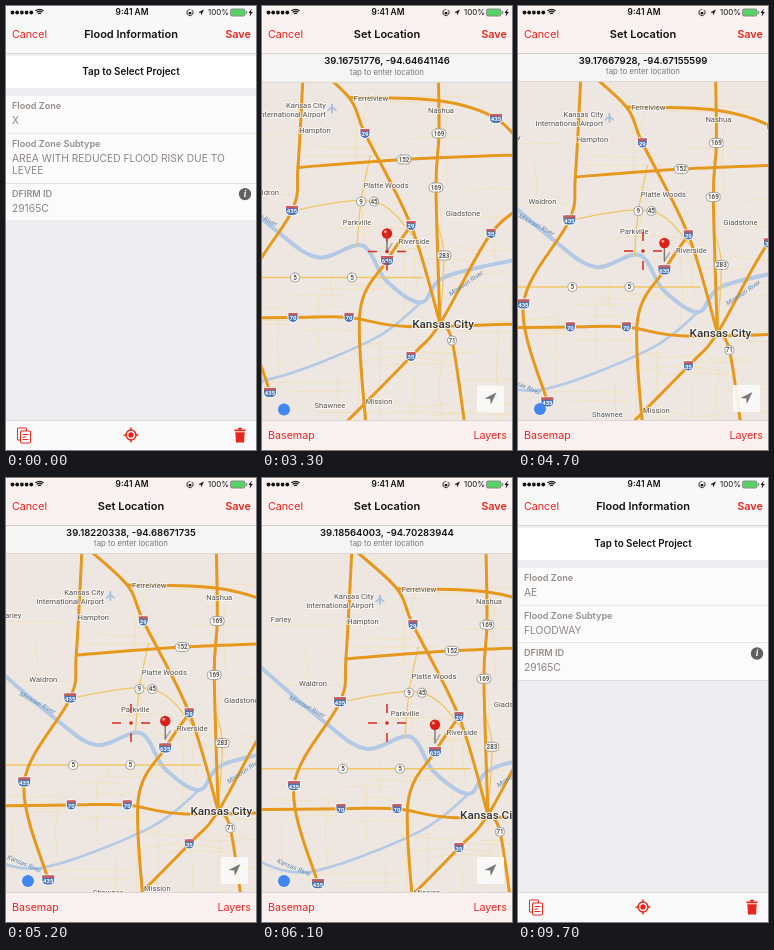
These frames come from a looping animation (250 px wide and 444 px high, 9900 ms). An HTML page with a canvas:

```html
<!DOCTYPE html>
<html lang="en">
<head>
<meta charset="utf-8">
<title>Flood information</title>
<style>
html, body { margin: 0; width: 100%; height: 100%; overflow: hidden; background: #eeedf1; }
canvas { display: block; }
</style>
</head>
<body>
<canvas id="stage" width="250" height="444"></canvas>
<script>
const ctx = document.getElementById('stage').getContext('2d');
const W = 250, H = 444, LOOP = 9900, STEP = 100;
const RED = '#e8261d', INK = '#111', GREY = '#8c8582', LINE = '#d0cccb';
const OPEN_AT = 2800, CLOSE_AT = 7332, RESULT_AT = 8000;
const UI = 'Inter, sans-serif', MAP = 'Roboto, sans-serif';

// Map centre over time
const CENTRES = [
  { at: 4000, lat: 39.16751776, lon: -94.64641146 },
  { at: 5200, lat: 39.18220338, lon: -94.68671735 },
  { at: 6100, lat: 39.18564003, lon: -94.70283944 },
  { at: 6400, lat: 39.18595240, lon: -94.70283944 }
];

// Each road runs smoothly through a few points; signs stand on the listed ones.
const ROADS = [
  { no: 5, kind: 'minor', via: [[-60, 271], [33, 271], [90, 271], [160, 271]], signs: [1, 2] },
  { no: 9, kind: 'minor', via: [[95, 240], [99, 195], [108, 150]], signs: [1] },
  { no: 45, kind: 'minor', via: [[30, 204], [112, 195], [155, 234]], signs: [1] },
  { no: 283, kind: 'minor', via: [[176, 220], [182, 249], [178, 317]], signs: [1] },
  { no: 152, kind: 'state', via: [[36, 161], [142, 153], [270, 148]], signs: [1] },
  { no: 169, kind: 'state', via: [[176, 50], [177, 127], [174, 181], [178, 317]], signs: [1, 2] },
  { no: 71, kind: 'state', via: [[178, 317], [190, 334], [203, 420]], signs: [1] },
  { no: 435, kind: 'interstate', via: [[42, 50], [36, 160], [30, 204], [-16, 288], [8, 386]], signs: [2, 3, 4] },
  { no: 435, kind: 'interstate', via: [[87, 91], [176, 94], [234, 112], [270, 150]], signs: [2] },
  { no: 29, kind: 'interstate', via: [[42, 50], [87, 91], [103, 127], [149, 219], [178, 317]], signs: [2, 3] },
  { no: 70, kind: 'interstate', via: [[-60, 312], [31, 311], [87, 311], [145, 320], [270, 317]], signs: [1, 2] },
  { no: 635, kind: 'interstate', via: [[149, 219], [125, 254], [98, 305], [104, 420]], signs: [1] },
  { no: 35, kind: 'interstate', via: [[80, 420], [149, 350], [178, 317], [229, 227], [270, 195]], signs: [1, 3] }
];
const RIVERS = [
  { width: 4, via: [[-60, 160], [14, 224], [56, 251], [100, 239], [124, 274], [159, 296], [184, 270], [270, 250]] },
  { width: 2.5, via: [[-60, 360], [0, 374], [109, 334], [159, 296]] }
];
const RIVER_NAMES = [['Missouri River', -3, 209, 0.5], ['Missouri River', 204, 277, -0.6], ['Kansas River', -16, 370, 0.4]];
const PLACES = [
  ['Ferrelview', 109, 92], ['Nashua', 179, 104], ['Kansas City', 44, 99],
  ['International Airport', 30, 108], ['Hampton', 53, 124], ['Platte Woods', 124, 179],
  ['Waldron', 3, 186], ['Farley', -29, 122], ['Parkville', 95, 216],
  ['Gladstone', 201, 207], ['Riverside', 152, 235], ['Shawnee', 68, 399], ['Mission', 117, 395]
];

function seeded(seed) {
  return () => (seed = seed * 16807 % 2147483647) / 2147483647;
}
// Local streets: bent, mostly square to the compass, denser to the south-east
const rand = seeded(42);
const STREETS = Array.from({ length: 70 }, () => {
  const x = 330 * Math.sqrt(rand()) - 60, y = 60 + 350 * Math.sqrt(rand());
  const half = 15 + 30 * rand(), bend = 10 * (rand() - 0.5);
  return rand() < 0.5
    ? [[x - half, y], [x, y + bend], [x + half, y]]
    : [[x, y - half], [x + bend, y], [x, y + half]];
});

function text(str, x, y, size, { color = INK, weight = 400, align = 'left', family = UI, style = '', halo } = {}) {
  ctx.font = `${style} ${weight} ${size}px ${family}`;
  ctx.textAlign = align;
  ctx.textBaseline = 'middle';
  if (halo) {
    ctx.strokeStyle = halo;
    ctx.lineWidth = 2;
    ctx.lineJoin = 'round';
    ctx.strokeText(str, x, y);
  }
  ctx.fillStyle = color;
  ctx.fillText(str, x, y);
}
function rect(x, y, w, h, color) {
  ctx.fillStyle = color;
  ctx.fillRect(x, y, w, h);
}
function disc(x, y, r, color) {
  ctx.beginPath();
  ctx.arc(x, y, r, 0, 7);
  ctx.fillStyle = color;
  ctx.fill();
}
function ring(x, y, r, color, width, from = 0, to = 7) {
  ctx.beginPath();
  ctx.arc(x, y, r, from, to);
  ctx.strokeStyle = color;
  ctx.lineWidth = width;
  ctx.stroke();
}
function box(x, y, w, h, r, fill, stroke) {
  ctx.beginPath();
  ctx.roundRect(x, y, w, h, r);
  if (fill) { ctx.fillStyle = fill; ctx.fill(); }
  if (stroke) { ctx.strokeStyle = stroke; ctx.lineWidth = 1; ctx.stroke(); }
}
function poly(points, color) {
  ctx.beginPath();
  for (const [x, y] of points) ctx.lineTo(x, y);
  ctx.fillStyle = color;
  ctx.fill();
}
// Catmull-Rom curve through the points
function curve(points, color, width) {
  ctx.beginPath();
  ctx.moveTo(...points[0]);
  for (let i = 1; i < points.length; i++) {
    const a = points[i - 1], b = points[i];
    const before = points[i - 2] || a, after = points[i + 1] || b;
    const c1 = a.map((v, k) => v + (b[k] - before[k]) / 6);
    const c2 = b.map((v, k) => v - (after[k] - a[k]) / 6);
    ctx.bezierCurveTo(...c1, ...c2, ...b);
  }
  ctx.strokeStyle = color;
  ctx.lineWidth = width;
  ctx.lineCap = ctx.lineJoin = 'round';
  ctx.stroke();
}
function at(x, y, angle, draw) {
  ctx.save();
  ctx.translate(x, y);
  ctx.rotate(angle);
  draw();
  ctx.restore();
}
function around(count, x, y, draw) {
  for (let i = 0; i < count; i++) at(x, y, i * 2 * Math.PI / count, () => draw(i));
}
function arrow(x, y, size, color) {
  poly([[1, -1], [-1, 0], [-0.05, 0.1], [0.05, 1]].map(([u, v]) => [x + u * size, y + v * size]), color);
}

// Critically damped spring, 0 to 1
function spring(ms) {
  const u = Math.max(0, ms) * 0.01826;
  return 1 - (1 + u) * Math.exp(-u);
}
function centreAt(t) {
  let i = 0;
  while (i < CENTRES.length - 2 && t > CENTRES[i + 1].at) i++;
  const a = CENTRES[i], b = CENTRES[i + 1];
  const p = Math.min(1, Math.max(0, (t - a.at) / (b.at - a.at)));
  const e = p * p * (3 - 2 * p);
  return { lat: a.lat + (b.lat - a.lat) * e, lon: a.lon + (b.lon - a.lon) * e };
}

function statusBar(t) {
  for (let i = 0; i < 5; i++) disc(6.5 + i * 4.7, 6.5, 1.9, INK);
  for (const r of [2.2, 4.2, 6.2]) ring(33.5, 9.5, r, INK, 1.2, -2.3, -0.84);
  if (t > 7200 && t < RESULT_AT) {
    around(12, 45.5, 6.5, i => {
      const age = (i - Math.floor(t / 83) % 12 + 12) % 12;
      rect(-0.4, -4.3, 0.8, 2.3, `rgba(60,60,60,${0.15 + age / 18})`);
    });
  }
  text('9:41 AM', 126, 6.5, 8.4, { weight: 600, align: 'center' });
  ring(184, 6.5, 3.1, INK, 0.9, -1, 4.6);
  rect(182.7, 6, 2.6, 2.2, INK);
  arrow(195, 6.5, 3, INK);
  text('100%', 223, 6.5, 7.9, { align: 'right' });
  box(224.5, 3, 14.5, 7, 1.5, '#55d365', '#8a8a8a');
  rect(240, 5, 1.2, 3, '#8a8a8a');
  poly([[245.7, 2.5], [242.6, 7], [244.4, 7], [243.6, 10.6], [246.8, 5.9], [245, 5.9]], INK);
}
function navBar(title, color, saveColor) {
  rect(0, 0, W, 47, color);
  rect(0, 47, W, 0.7, LINE);
  text('Cancel', 6, 28.5, 10.7, { color: RED });
  text(title, 125, 28.5, 11, { weight: 600, align: 'center' });
  text('Save', 245, 28.5, 10.9, { weight: 600, align: 'right', color: saveColor });
}
function toolBar(color) {
  rect(0, 414, W, 30, color);
  rect(0, 414, W, 0.7, LINE);
}

function floodIcons() {
  box(11.5, 422, 9, 12, 0.5, null, RED);
  box(14.5, 425, 10, 12, 0.5, '#fff', RED);
  for (let i = 0; i < 3; i++) rect(16.5, 428 + i * 2.5, i === 1 ? 3.5 : 6, 1, RED);

  ring(125, 429, 5, RED, 1.4);
  disc(125, 429, 2.7, RED);
  around(4, 125, 429, () => rect(4.5, -0.7, 3, 1.4, RED));

  rect(228.5, 423.5, 11, 1.8, RED);
  rect(232, 421.8, 4, 1.8, RED);
  poly([[229.3, 426.3], [238.7, 426.3], [238, 436.5], [230, 436.5]], RED);
}
function floodScreen(t) {
  const updated = t >= RESULT_AT;
  const rows = [
    ['Flood Zone', updated ? 'AE' : 'X'],
    ['Flood Zone Subtype', ...(updated ? ['FLOODWAY'] : ['AREA WITH REDUCED FLOOD RISK DUE TO', 'LEVEE'])],
    ['DFIRM ID', '29165C']
  ];
  rect(0, 0, W, H, '#eeedf1');
  navBar('Flood Information', '#f8f8f8', RED);
  rect(0, 50, W, 32, '#fff');
  text('Tap to Select Project', 125, 66, 9.8, { weight: 600, align: 'center' });
  let y = 90;
  for (const [label, ...lines] of rows) {
    const height = 25 + 12.6 * lines.length;
    rect(0, y, W, height, '#fcfbfc');
    text(label, 6, y + 10.3, 9.1, { weight: 600, color: '#958d87' });
    lines.forEach((line, i) => text(line, 6, y + 24.9 + 12.7 * i, 10.25, { color: GREY }));
    if (label === 'DFIRM ID') {
      disc(239, y + 10.3, 6.2, '#606060');
      text('i', 239, y + 10.8, 9.5, { color: '#fff', weight: 700, style: 'italic', align: 'center', family: 'Liberation Serif, serif' });
    }
    y += height;
    rect(0, y - 0.7, W, 0.7, '#d4d2d4');
  }
  toolBar('#f9f9f9');
  floodIcons();
}

function shield(number, x, y) {
  const w = number > 99 ? 13 : 10;
  box(x - w / 2, y - 5, w, 10, [2, 2, 5, 5], '#4a74b4', '#fff');
  rect(x - w / 2 + 0.5, y - 4.6, w - 1, 2.4, '#cf5a56');
  text(number, x, y + 1.2, 6, { color: '#fff', weight: 700, align: 'center', family: MAP });
}
function routeSign(number, x, y) {
  const w = number > 99 ? 14 : 9;
  box(x - w / 2, y - 4.5, w, 9, 4, '#fbfaf6', '#a5a19b');
  text(number, x, y + 0.4, 6.3, { color: '#444', weight: 500, align: 'center', family: MAP });
}
function mapLayer() {
  const highways = ROADS.filter(road => road.kind !== 'minor');
  for (const points of STREETS) curve(points, '#f1e0b8', 0.9);
  for (const { via, width } of RIVERS) curve(via, '#b4c9e6', width);
  for (const { via } of ROADS) curve(via, '#f0c765', 1.3);
  for (const { via } of highways) curve(via, '#e6981c', 3);

  for (const [name, x, y, angle] of RIVER_NAMES)
    at(x, y, angle, () => text(name, 0, 0, 6.5, { color: '#5b87b5', style: 'italic', align: 'center', family: MAP }));
  for (const { no, kind, via, signs } of ROADS) {
    const sign = kind === 'interstate' ? shield : routeSign;
    for (const i of signs) sign(no, ...via[i]);
  }
  for (const [name, x, y] of PLACES)
    text(name, x, y, 7.6, { color: '#55514d', align: 'center', family: MAP, halo: 'rgba(255,255,255,.7)' });
  text('Kansas City', 181, 318, 11.7, { color: '#333', weight: 500, align: 'center', family: MAP, halo: 'rgba(255,255,255,.85)' });

  // Airport
  curve([[70, 98], [70, 106]], '#a3bddd', 1.8);
  curve([[66, 104], [70, 101], [74, 104]], '#a3bddd', 1.5);
  // Pin
  curve([[125, 245], [130, 237]], 'rgba(90,90,90,.4)', 1.5);
  curve([[125, 245], [125, 230]], '#777', 1.4);
  disc(125, 227, 5.2, '#dc2018');
  disc(123.4, 225.2, 1.5, '#f79a92');
}
function mapScreen(t) {
  const { lat, lon } = centreAt(t);
  ctx.save();
  ctx.beginPath();
  ctx.rect(0, 75, W, 339);
  ctx.clip();
  rect(0, 75, W, 339, '#eee7e1');
  ctx.translate((CENTRES[0].lon - lon) * 850, (lat - CENTRES[0].lat) * 1090);
  mapLayer();
  ctx.restore();

  around(4, 125, 245, () => rect(10, -0.8, 9, 1.6, '#d8342c'));
  disc(125, 245, 1.8, '#e0241c');
  disc(22, 403, 6, '#4285f4');
  box(215, 379, 27, 27, 1, 'rgba(250,249,248,.9)');
  arrow(228.5, 392, 6, '#777');

  navBar('Set Location', '#f9f2f1', t > 6900 ? '#f2b5b3' : RED);
  rect(0, 48, W, 28, '#f7f5f4');
  rect(0, 75.3, W, 0.7, LINE);
  text(`${lat.toFixed(8)}, ${lon.toFixed(8)}`, 125, 55, 9.5, { weight: 600, align: 'center' });
  text('tap to enter location', 125, 66, 7.8, { color: '#777', align: 'center' });
  toolBar('#faf0ef');
  text('Basemap', 6, 429.5, 10.7, { color: RED });
  text('Layers', 245, 429.5, 10.7, { color: RED, align: 'right' });
}

function frame() {
  const t = Math.floor(performance.now() % LOOP / STEP) * STEP;
  const top = H * (1 - spring(t - OPEN_AT) + spring(t - CLOSE_AT));
  floodScreen(t);
  if (top < H - 0.5) at(0, top, 0, () => mapScreen(t));
  statusBar(t);
  requestAnimationFrame(frame);
}
frame();
</script>
</body>
</html>
```
